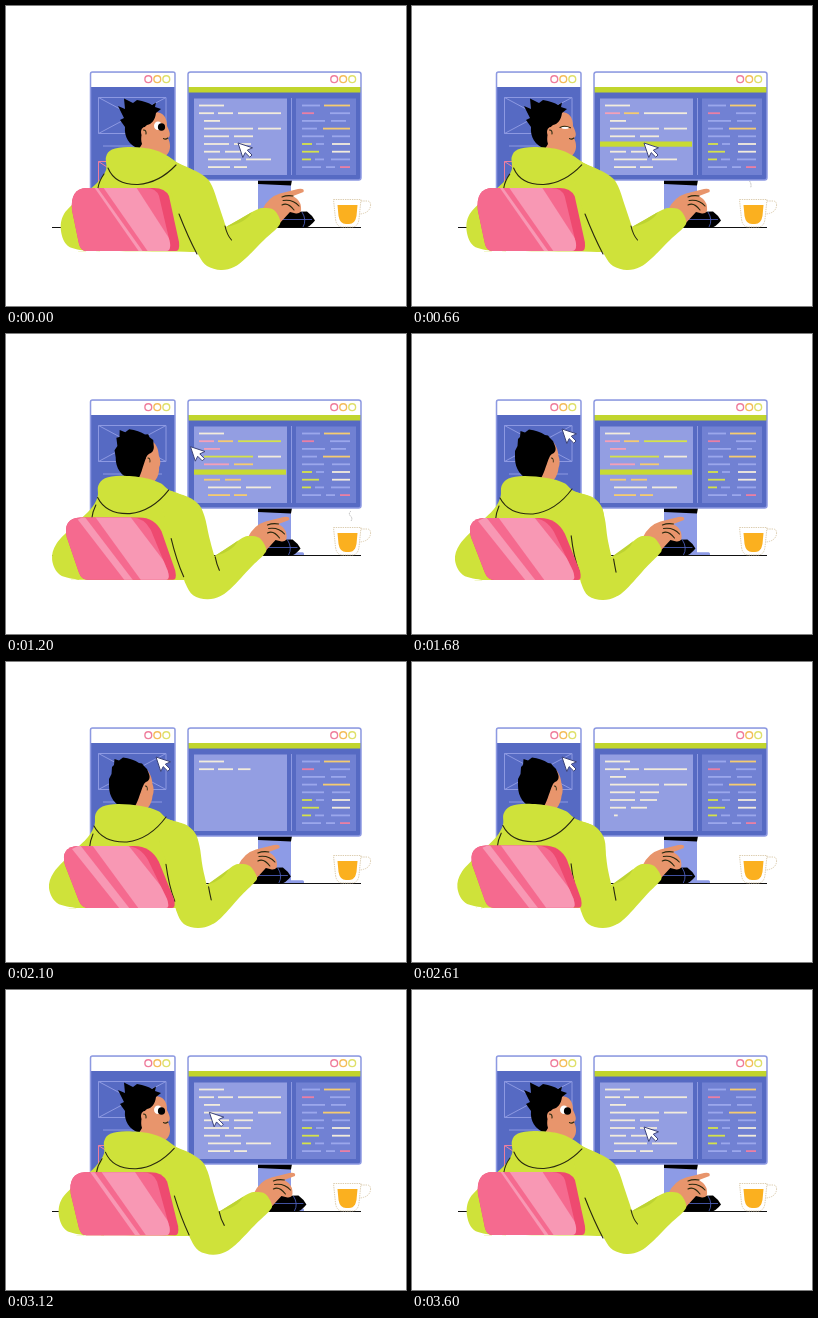
Write an HTML page that moves like this. It is 400 px wide and 300 px high and loops after 3.63 s.

```html
<!DOCTYPE html>
<html lang="en">
<head>
<meta charset="utf-8">
<title>Developer at work</title>
<style>
html, body { margin: 0; width: 100%; height: 100%; overflow: hidden; background: #fff; }
svg { display: block; width: 400px; height: 300px; }
.frame { fill: #566ac3; stroke: #8d99e2; stroke-width: 1.5; }
.wire { fill: none; stroke: #8d99e2; stroke-width: 1; }
.seam { fill: none; stroke: #29290f; stroke-width: 1.1; stroke-linecap: round; }
.lime { fill: #cfe23a; }
.skin { fill: #e8956c; }
.cup { fill: none; stroke: #d8c8a8; stroke-width: .9; stroke-dasharray: 1.4 .9; }
.steam { fill: none; stroke: #bdbdbd; stroke-width: 1; stroke-dasharray: 1.6 .8; }
</style>
</head>
<body>
<svg viewBox="0 0 400 300">
  <defs>
    <clipPath id="seat"><path id="seatClip"/></clipPath>
    <g id="dots" fill="none" stroke-width="1.4">
      <circle r="3.4" stroke="#ef7d9c"/>
      <circle cx="9" r="3.4" stroke="#f4bd5a"/>
      <circle cx="18" r="3.4" stroke="#dfe06a"/>
    </g>
  </defs>

  <!-- left window -->
  <rect class="frame" x="84.5" y="66" width="84.5" height="118" rx="2"/>
  <path d="M85.2 81V68q0-1.3 1.3-1.3H167q1.3 0 1.3 1.3V81Z" fill="#fff"/>
  <use href="#dots" x="142.3" y="73.2"/>
  <path class="wire" d="M92.5 91.5H160V127.5H92.5ZL160 127.5M160 91.5L92.5 127.5M97 140H156"/>
  <path class="wire" style="stroke:#ee7f9f" d="M92.5 155.5H130V180H92.5ZL130 180"/>

  <!-- monitor -->
  <rect x="240" y="218.3" width="58" height="3.5" rx="1.5" fill="#8d9be6"/>
  <path d="M252 174H285V221H252Z" fill="#8d9be6"/>
  <path d="M252 174H286L285 179.5L252 178Z"/>
  <rect class="frame" x="182" y="66" width="173" height="108" rx="2.5"/>
  <path d="M182.7 81V68.5q0-1.8 1.8-1.8H352.5q1.8 0 1.8 1.8V81Z" fill="#fff"/>
  <path d="M182.7 81H354.3V86.5H182.7Z" fill="#c1d52d"/>
  <use href="#dots" x="328.2" y="73.2"/>
  <path d="M188 92.5H281V169H188Z" fill="#939ee2"/>
  <path d="M290 92.5H350V169H290Z" fill="#7181d3"/>
  <path class="wire" d="M285.5 92V169"/>
  <g id="code"></g>
  <rect id="mark" x="188" y="135.5" height="5.2" fill="#c8da32"/>

  <path d="M46 221.5H355" stroke="#111" stroke-width="1.2"/>

  <!-- cup -->
  <path d="M327.5 193.5H355L351 221H331.5Z" fill="#fff"/>
  <path d="M331.5 199H351.5L350.5 210Q349 218 343 218H340Q334 218 332.5 210Z" fill="#fbb01f"/>
  <path class="cup" d="M327.5 193.5H355L353 213Q352 221 346 221H336.5Q330.5 221 329.5 213ZM355 195H361Q365 195 364.5 200Q363.5 207 354 208"/>
  <path class="steam" id="wispA" d="M337.5 175Q340 178.5 338.5 182"/>
  <path class="steam" id="wispB" d="M345 177Q342 179.5 344.5 182T345 187"/>

  <path id="cursor" d="M0 0L14.5 4.8L9.3 7.2L14 12L11.8 14.2L7.2 9.6L4.8 14.5Z" fill="#fff" stroke="#3c4378" stroke-width="1" stroke-linejoin="round"/>

  <!-- mouse and hand -->
  <g id="hand">
    <path d="M262 221.5Q268 208 279 206L301 205.5Q306 209 309 214.5Q304 221 299 221.5Z"/>
    <path class="wire" style="stroke:#5266c8;stroke-width:.8" d="M275 213.5H306M296 206Q301 214 297 221"/>
    <path class="skin" d="M256 204Q262 191 274 187.5L292 183Q299 182 297.5 186L287 190Q295 195 295 201Q296 208 290 207.5L284 206L273 218Z"/>
    <path class="seam" d="M276 191Q281 189 287 190M277 194.5Q287 193 293 200M276 199Q282 196 288 204"/>
  </g>

  <!-- person -->
  <g id="head">
    <path class="skin" id="face"/>
    <g id="eyes">
      <ellipse cx="152" cy="119.8" rx="4" ry="4.3" fill="#fff"/>
      <ellipse cx="155.5" cy="121" rx="3.6" ry="3.8"/>
    </g>
    <g id="lids">
      <path d="M148.5 121.5Q153 119.5 158 121.5Q153 124.5 148.5 121.5Z" fill="#fff"/>
      <path class="seam" d="M148 121.5Q153 119 158.5 121.8"/>
    </g>
    <path class="seam" id="mouth" d="M157.5 132.5Q159.5 134 161.8 132"/>
    <path id="hair"/>
    <g id="ear">
      <ellipse class="skin" rx="4" ry="5"/>
      <path class="seam" d="M-1.5 -2Q1.5 -2 1 2"/>
    </g>
  </g>
  <path class="lime" id="torso"/>
  <path class="lime" id="arm"/>
  <path id="shade" fill="#bdd332"/>
  <path class="seam" id="hood"/>
  <path class="seam" id="sleeve"/>
  <path id="back" fill="#ee4a70"/>
  <path id="cushion" fill="#f56a8f"/>
  <g clip-path="url(#seat)" fill="#f898b4">
    <path id="shineA"/>
    <path id="shineB"/>
  </g>
</svg>

<script>
const LOOP = 3630;
const $ = id => document.getElementById(id);
const set = (el, attrs) => { for (const k in attrs) el.setAttribute(k, attrs[k]); };
const clamp = v => Math.min(1, Math.max(0, v));
const mix = (a, b, p) => a + (b - a) * p;
const ease = (t, from, to) => {
  const p = clamp((t - from) / (to - from));
  return p * p * (3 - 2 * p);
};
const numbers = /-?\d+(?:\.\d+)?/g;

// Blend two paths that share the same commands
function blend([a, b], p) {
  const end = b.match(numbers);
  let i = 0;
  return a.replace(numbers, n => mix(+n, +end[i++], p).toFixed(2));
}

// Closed smooth curve through the points of a path
function smooth(path) {
  const n = path.match(numbers).map(Number), len = n.length / 2;
  const at = i => { const k = (i + len) % len; return [n[2 * k], n[2 * k + 1]]; };
  let d = 'M' + at(0);
  for (let i = 0; i < len; i++) {
    const [p, q, r, s] = [at(i - 1), at(i), at(i + 1), at(i + 2)];
    const c1 = q.map((v, k) => v + (r[k] - p[k]) / 6);
    const c2 = r.map((v, k) => v - (s[k] - q[k]) / 6);
    d += `C${c1} ${c2} ${r}`;
  }
  return d + 'Z';
}

function track(keys, t) {
  const i = Math.max(1, keys.findIndex(k => k[0] >= t));
  const [t0, a] = keys[i - 1], [t1, b] = keys[i];
  return mix(a, b, (t - t0) / (t1 - t0));
}

// Each shape: looking at the monitor, looking at the left window
const shapes = {
  torso: [
    '100,151 106,143.5 122,141 145,143 160,149 172,157 190,167 200,190 195,246 195,246 80,245 80,245 62,240 55,225 58,208 75,191 91,177 100,164',
    '89.5,152 96.5,144.5 112,142 135,144 152,149 162,157 185,167 192,190 180,246 180,246 70,246 70,246 51,241 43,226 48,210 66,191 82,175 88.5,163'],
  arm: [
    '160,157 180,161 198,170 206,180 213,200 220,221 220,221 236,212 250,204 258,202 268,204 274,214 272,221 258,234 240,252 228,261 215,264 201,260 193,250 186,235 172,208',
    '150,160 175,161 188,170 193,184 196,205 200,223 200,223 215,213 226,204 233,202 243,204 250,215 247,221 235,233 215,255 204,263 191,266 177,262 170,250 167,235 160,202'],
  shade: [
    'M220 221L246 206Q240 217 220 221Z',
    'M200 223L222 207Q217 218 200 223Z'],
  hood: [
    'M102 162Q109 179 132 178.5Q153 177 170 159M98 168Q93 175 92 182',
    'M88 164Q97 181 121 180Q144 177 160 155M87 172Q84 179 83.5 186'],
  sleeve: [
    'M173 208Q182 231 191 248M219 220Q221 229 225.5 234',
    'M159.5 202Q162 223 168 239M202 225Q203 231 204.5 238'],
  face: [
    'M148 106C158 106 161 112 161 120C164 126 165 130 162 132C165 138 166 148 156 152L138 150C132 146 130 140 132 132C133 122 140 112 148 106Z',
    'M142 106C147 110 149 116 149.5 122C151 126 151 130 149.5 134C149 140 146 147 138 152L120 152C115 148 114 140 116 132C118 122 132 110 142 106Z'],
  hair: [
    'M133 143C123 139 118 131 119 121L114 114L118 112L112 100L119 103L118 92.5L127 97L131 94C138 95 143 97 146 99L150 96.5L149 101L155 103L150 107C149 114 146 118 141 119C136 122 134 132 136 138Z',
    'M122 147C112 143 106 135 106 124L106 117L108.5 112L109 105L111 103L111.5 97L116 98.5L120 95.5C126 96.5 132 98 136 101L139 101.5L141 104L144 107L146 112C147.5 116 146 119 143 120C139 122 137 137 131 146Z'],
  back: [
    'M80 182L148 182Q159 182 163 190L173 236Q174 245 170 245L80 245Q75 245 73 238L66 204Q64 183 80 182Z',
    'M72 184L128 184Q145 184 153 200L168 237Q170 246 166 246L82 246Q76 246 73 239L59 203Q54 185 72 184Z'],
  cushion: [
    'M80 182L140 182Q150 182 153 190L164 237Q165 245 160 245L80 245Q75 245 73 238L66 204Q64 183 80 182Z',
    'M72 184L120 184Q134 184 142 198L161 237Q164 246 160 246L82 246Q76 246 73 239L59 203Q54 185 72 184Z'],
  shineA: ['M97 181L130 181L168 240L168 247L143 247Z', 'M86 183L122 183L166 238L166 247L133 247Z'],
  shineB: ['M88 181L91 181L138 247L134 247Z', 'M66 187L74 183L124 247L114 247Z']
};

const CREAM = '#f2ecdc', PINK = '#f4a0b8', ROSE = '#ea7fa4', GOLD = '#f5cb70', LIME = '#d5e24a', LILAC = '#9ba7ec';
const rowY = k => 99.5 + 7.7 * k;

function bar(x, k, w, fill) {
  const el = document.createElementNS('http://www.w3.org/2000/svg', 'rect');
  set(el, { x, y: rowY(k) - .9, width: w, height: 1.8, fill });
  $('code').append(el);
  return el;
}

// Rows of [start, end, highlighted colour]
const rows = [
  [[193, 218, CREAM]],
  [[193, 208, PINK], [212, 227, GOLD], [232, 275, LIME]],
  [[198, 214, PINK]],
  [[198, 247, LIME], [252, 275, CREAM]],
  [[198, 223, PINK], [228, 247, GOLD]],
  [[198, 223, CREAM], [228, 245, CREAM]],
  [[198, 214, GOLD], [219, 235, GOLD]],
  [[202, 235, CREAM], [240, 265, CREAM]],
  [[202, 224, GOLD], [228, 241, GOLD]]
];
const bars = rows.flatMap((row, k) => row.map(([x, end, hue], j) =>
  ({ el: bar(x, k, end - x, CREAM), x, end, hue, k, j })));

const side = [
  [[296, 314, LILAC], [318, 344, GOLD]],
  [[296, 308, ROSE], [324, 344, LILAC]],
  [[296, 319, LILAC], [325, 340, LILAC]],
  [[296, 311, LILAC], [317, 344, GOLD]],
  [[296, 318, LILAC], [326, 344, LILAC]],
  [[296, 306, LIME], [310, 318, LILAC], [326, 344, CREAM]],
  [[296, 313, LIME], [326, 344, CREAM]],
  [[296, 305, LIME], [309, 318, LILAC], [325, 344, LILAC]],
  [[296, 315, LILAC], [320, 329, LILAC], [334, 344, ROSE]]
];
side.forEach((row, k) => row.forEach(([x, end, hue]) => bar(x, k, end - x, hue)));

const RETYPE = 1950, ROW_MS = 92;
const lean = [[0, 0], [300, -.12], [640, 0], [860, .3], [1080, .66], [1200, .74], [1680, 1],
  [2200, 1], [2610, .8], [2900, .42], [3120, .18], [3400, .04], [LOOP, 0]];

function drawCode(t) {
  const typing = t >= RETYPE;
  for (const { el, x, end, hue, k, j } of bars) {
    const head = typing ? 190 + 85 * (t - RETYPE - k * ROW_MS) / ROW_MS : 300;
    const lit = !typing && t >= 600 + (k - 1) * 75 + j * 50;
    set(el, { width: Math.max(0, Math.min(end, head) - x), fill: lit ? hue : CREAM });
  }
  set($('mark'), { width: typing ? 0 : 92 * ease(t, 480, 620) });
}

function draw(t) {
  const body = track(lean, t);
  const move = ease(t, 940, 1412) - ease(t, 2790, 3340);
  const turn = ease(t, 850, 1360) - ease(t, 2640, 3040);
  const sway = Math.sin(2 * Math.PI * t / LOOP * 3) * .035;
  const reach = move + sway * move;

  const pose = { torso: body, arm: reach, shade: reach, hood: body, sleeve: reach, face: turn,
    hair: turn, back: body, cushion: body, shineA: body, shineB: body };
  for (const id in pose) {
    const d = blend(shapes[id], pose[id]);
    set($(id), { d: id === 'torso' || id === 'arm' ? smooth(d) : d });
  }
  set($('seatClip'), { d: blend(shapes.cushion, body) });

  const press = 1 - .14 * (ease(t, 400, 470) - ease(t, 490, 570));
  set($('cursor'), { transform: `translate(${232 - 82 * move} ${137 - 42 * move}) scale(${press})` });
  set($('hand'), { transform: `translate(${-25 * reach} 0)` });
  set($('head'), { transform: `translate(${-15 * (body - .8) * turn} 0)` });
  set($('ear'), { transform: `translate(${mix(139, 143.5, turn)} 126) scale(${mix(1, .75, turn)} 1)` });

  const shut = t > 570 && t < 780;
  const slide = `translate(${10 * turn} 0)`;
  set($('eyes'), { transform: slide, opacity: shut || turn > .3 ? 0 : 1 });
  set($('lids'), { transform: slide, opacity: shut && turn < .3 ? 1 : 0 });
  set($('mouth'), { opacity: turn > .3 ? 0 : 1 });

  set($('wispA'), { opacity: ease(t, 540, 660) - ease(t, 760, 900) });
  set($('wispB'), { opacity: ease(t, 900, 1100) - ease(t, 1300, 1500) });
  drawCode(t);
}

const start = performance.now();
function tick(now) {
  draw(Math.max(0, now - start) % LOOP);
  requestAnimationFrame(tick);
}
draw(0);
requestAnimationFrame(tick);
</script>
</body>
</html>
```
